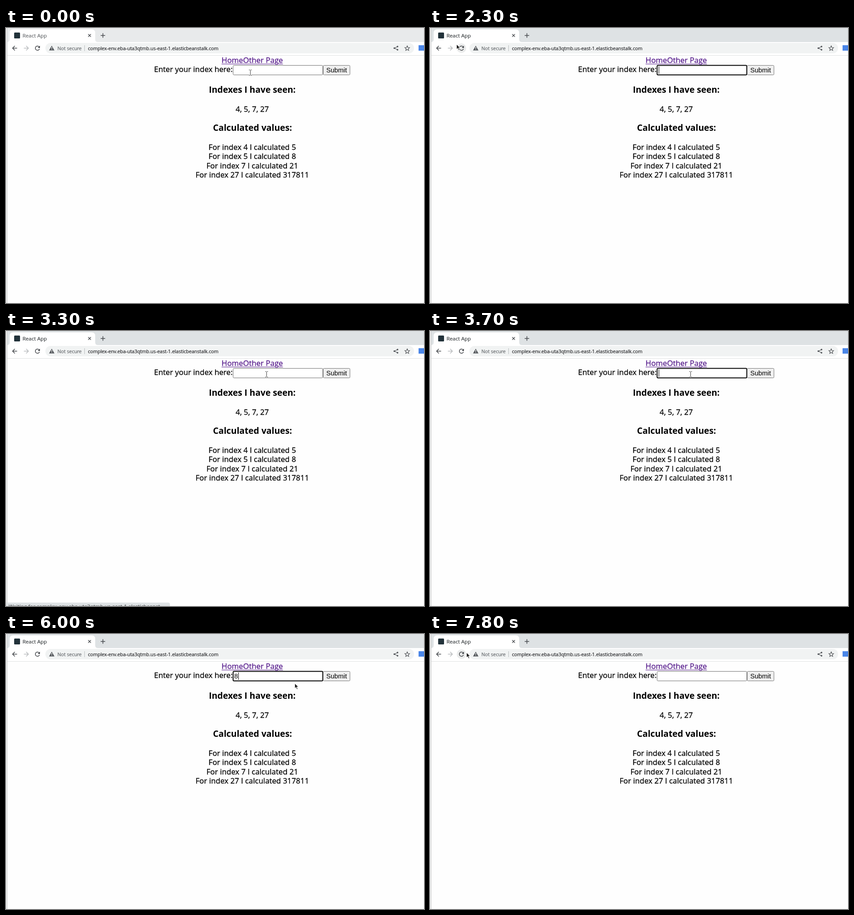
An HTML page with a canvas that plays this animation: 923x607 px, repeating every 8000 ms.

```html
<!DOCTYPE html>
<html lang="en">
<head>
<meta charset="utf-8">
<title>React App</title>
<style>
html, body { margin: 0; width: 100%; height: 100%; overflow: hidden; background: #fff; }
canvas { display: block; width: 923px; height: 607px; }
</style>
</head>
<body>
<canvas id="stage"></canvas>
<script>
const W = 923, H = 607, LOOP = 8000, STEP = 100;
const UI = '"Open Sans", "Noto Sans", sans-serif';
const FORM = '"Liberation Sans", Arial, sans-serif';
const HOST = 'complex-env.eba-uta3qtmb.us-east-1.elasticbeanstalk.com';
const MID = 543.75, BODY = 16.8;

const canvas = document.getElementById('stage');
const c = canvas.getContext('2d');
const dpr = window.devicePixelRatio || 1;
canvas.width = W * dpr;
canvas.height = H * dpr;

// pointer path: time, x, y
const PATH = [
  [0, 540, 98], [1700, 540, 98], [2300, 59, 36], [2600, 59, 36],
  [3300, 576, 95], [3900, 576, 95], [4200, 574, 101], [5800, 574, 101],
  [6050, 645, 110], [6300, 722, 99], [6600, 722, 99], [7300, 38, 72],
  [7600, 58, 44], [7700, 58, 44], [7800, 81, 41], [8000, 81, 41]
];

const within = (t, a, b) => t >= a && t < b;

function pointerAt(t) {
  const i = PATH.findIndex((p, n) => n && t <= p[0]);
  const [t0, x0, y0] = PATH[i - 1], [t1, x1, y1] = PATH[i];
  const u = (t - t0) / (t1 - t0), k = u * u * (3 - 2 * u);
  return { x: Math.round(x0 + (x1 - x0) * k), y: Math.round(y0 + (y1 - y0) * k) };
}

function stateAt(t) {
  return {
    t,
    pointer: pointerAt(t),
    active: !(t < 1300 || within(t, 6500, 6600)),
    focused: within(t, 1300, 3200) || within(t, 3700, 6500),
    caret: within(t, 1300, 1800) || within(t, 2300, 3200) || within(t, 3700, 4200) ||
      within(t, 4800, 5300) || within(t, 5800, 6400),
    value: within(t, 5900, 6600) ? '8' : '',
    loading: within(t, 2500, 3200),
    status: within(t, 2600, 3500)
  };
}

function text(str, x, y, size, color = '#000', align = 'left', family = UI, weight = 400) {
  c.font = `${weight} ${size}px ${family}`;
  c.textAlign = align;
  c.fillStyle = color;
  c.fillText(str, x, y);
  if (family === UI && weight === 400) {
    // a hairline outline gives the regular weight a sturdier stem
    c.strokeStyle = color;
    c.lineWidth = size * 0.018;
    c.strokeText(str, x, y);
  }
}

function rect(x, y, w, h, color) {
  c.fillStyle = color;
  c.fillRect(x, y, w, h);
}

function round(x, y, w, h, r, fill, stroke, lw = 1) {
  c.beginPath();
  c.roundRect(x, y, w, h, r);
  if (fill) { c.fillStyle = fill; c.fill(); }
  if (stroke) { c.strokeStyle = stroke; c.lineWidth = lw; c.stroke(); }
}

function disc(x, y, r, color) {
  c.beginPath();
  c.arc(x, y, r, 0, 7);
  c.fillStyle = color;
  c.fill();
}

function draw(d, color, lw, x = 0, y = 0, fill) {
  const p = new Path2D(d);
  c.save();
  c.translate(x, y);
  if (fill) { c.fillStyle = fill; c.fill(p); }
  if (color) { c.strokeStyle = color; c.lineWidth = lw; c.stroke(p); }
  c.restore();
}

function tabStrip(s) {
  rect(0, 0, W, 31, s.active ? '#dee2e4' : '#e8eaeb');
  draw('M2 31Q8 31 8 25V11Q8 3 16 3H189Q197 3 197 11V25Q197 31 203 31Z', null, 0, 0, 0, '#fff');
  if (s.loading) {
    const sweep = 0.12 + Math.max(0, s.t - 2600) / 160;
    c.beginPath();
    c.arc(24.5, 16.5, 6, -Math.PI / 2, -Math.PI / 2 - Math.min(sweep, 5), true);
    c.strokeStyle = '#a8abae';
    c.lineWidth = 1.5;
    c.stroke();
  } else {
    round(18, 10, 13, 13, 1.5, '#22323a');
  }
  text('React App', 36.5, 20.5, 11.5, s.active ? '#3c4043' : '#6a6d70');
  draw('M-3-3L3 3M3-3L-3 3', '#45484c', 1.4, 184.5, 16.5);
  draw('M-5 0H5M0-5V5', '#45484c', 1.5, 214, 16.5);
}

function reload(s) {
  const { x, y } = s.pointer;
  if (Math.abs(x - 70) < 13 && Math.abs(y - 44) < 13)
    disc(69.5, 44.5, 10.5, s.loading ? '#d9dadb' : '#ebecec');
  c.beginPath();
  c.arc(69.5, 44.5, 4.7, 0.35, -0.75);
  c.strokeStyle = '#45484c';
  c.lineWidth = 1.5;
  c.stroke();
  draw('M75 39V44H70Z', null, 0, 0, 0, '#45484c');
}

function toolbar(s) {
  rect(0, 31, W, 29, '#fff');
  draw('M11 0H1M6-5L1 0L6 5', '#45484c', 1.5, 13.5, 44.5);
  draw('M0 0H10M5-5L10 0L5 5', '#b9bcbe', 1.5, 39.5, 44.5);
  round(87, 33, 814, 23, 11.5, '#f1f3f3');
  reload(s);
  draw('M0-5.5L6 5H-6Z', null, 0, 101, 44.5, '#55595d');
  rect(100.4, 42, 1.3, 3.6, '#fff');
  rect(100.4, 46.7, 1.3, 1.3, '#fff');
  text('Not secure', 113.5, 48.5, 10.62, '#606468');
  rect(173, 38, 1, 13, '#b8bbbe');
  text(HOST, 181, 48.5, 10.56, '#202124');

  draw('M3.5-3.5L-3.5 0L3.5 3.5', '#505357', 1.1, 861, 44.5);
  for (const [x, y] of [[864.5, 41], [857.5, 44.5], [864.5, 48]]) disc(x, y, 1.8, '#505357');

  c.beginPath();
  for (let i = 0; i < 10; i++) {
    const a = i * Math.PI / 5 - Math.PI / 2, r = i % 2 ? 2.5 : 5.6;
    c.lineTo(886 + r * Math.cos(a), 45 + r * Math.sin(a));
  }
  c.closePath();
  c.strokeStyle = '#505357';
  c.lineWidth = 1.2;
  c.stroke();

  rect(911, 38, 12, 12, '#4a86e8');
  rect(0, 60, W, 1, '#dfe0e1');
}

function links() {
  const label = 'HomeOther Page', color = '#551a8b', y = 77;
  c.font = `${BODY}px ${UI}`;
  c.textAlign = 'center';
  const w = c.measureText(label).width;
  rect(MID - w / 2, y + 2, w, 1, color);
  c.strokeStyle = '#fff';
  c.lineWidth = 2;
  c.strokeText(label, MID, y);
  text(label, MID, y, BODY, color, 'center');
}

function form(s) {
  const { x, y } = s.pointer;
  text('Enter your index here:', 500.5, 97, BODY, '#000', 'right');
  round(501.5, 82.5, 198, 21, 2, '#fff', s.focused ? '#000' : '#6e6e6e', s.focused ? 2 : 1);
  text(s.value, 504, 98, 14.67, '#000', 'left', FORM);
  if (s.caret) rect(s.value ? 513 : 505, 85, 1, 16, '#000');
  const over = x >= 700 && x < 760 && y >= 82 && y < 104;
  round(700.5, 82.5, 59, 21, 2, over ? '#e8e8e8' : '#efefef', '#767676');
  text('Submit', 730, 98, 14.67, '#000', 'center', FORM);
}

function page(s) {
  links();
  form(s);
  text('Indexes I have seen:', MID, 143, 19.2, '#000', 'center', UI, 700);
  text('4, 5, 7, 27', MID, 185, BODY, '#000', 'center');
  text('Calculated values:', MID + .5, 227, 19.3, '#000', 'center', UI, 700);
  [[4, 5], [5, 8], [7, 21], [27, 317811]].forEach(([n, v], i) =>
    text(`For index ${n} I calculated ${v}`, MID, 269 + i * 20.4, BODY, '#000', 'center'));
}

function statusBar() {
  round(0, 599.5, 362, 20, [0, 4, 0, 0], '#dee2e4');
  text('Waiting for ' + HOST.slice(0, -7) + '...', 6, 612, 11.5, '#4a4d50');
}

function pointer({ x, y }) {
  const beam = x > 503 && x < 698 && y > 82 && y < 105;
  if (beam) {
    const d = 'M-3-6H-1L0-5L1-6H3M0-5V5M-3 6H-1L0 5L1 6H3';
    draw(d, '#fff', 2.4, x - .5, y + .5);
    draw(d, '#3a3a3a', 1, x - .5, y + .5);
  } else {
    draw('M0 0V12L2.8 9.4L4.8 14L7 13L5 8.6H8.8Z', '#fff', 1.2, x - .5, y - .5, '#1c1c1c');
  }
}

function render(t) {
  const s = stateAt(t);
  c.setTransform(dpr, 0, 0, dpr, 0, 0);
  rect(0, 0, W, H, '#fefefe');
  tabStrip(s);
  toolbar(s);
  page(s);
  rect(0, 0, 2, H, '#f4f4f4');
  rect(2, 0, 1, H, '#c4c5c6');
  if (s.status) statusBar();
  pointer(s.pointer);
}

let start;
function tick(now) {
  start ??= now;
  const t = (now - start) % LOOP;
  render(Math.floor(t / STEP) * STEP);
  requestAnimationFrame(tick);
}
requestAnimationFrame(tick);
</script>
</body>
</html>
```
